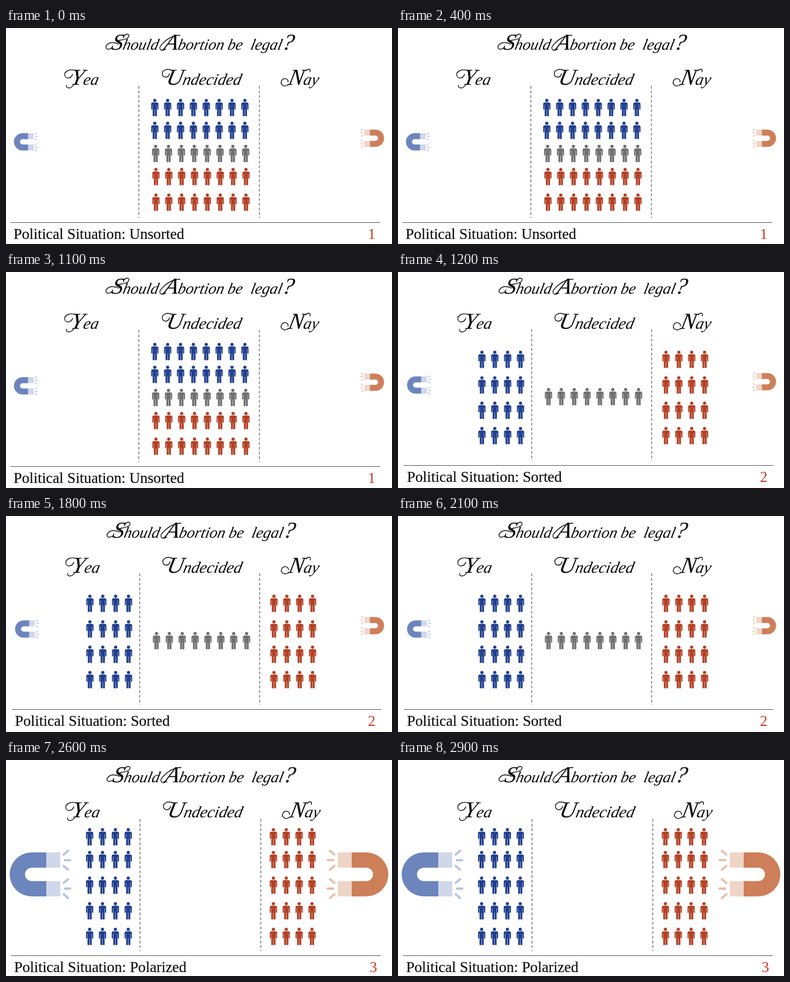
Recreate the animation shown at these times as an HTML page. Size 690 by 388 pixels, loop 3.2 s.

```html
<!DOCTYPE html>
<html lang="en">
<head>
<meta charset="utf-8">
<title>Political Situation</title>
<style>
  html, body { margin: 0; width: 100%; height: 100%; overflow: hidden; background: #fff; }
  svg { display: block; width: 100%; height: 100%; }
  .script { font: italic 28px "Liberation Serif", "Times New Roman", serif; fill: #0c0c0c; }
  .script.head { font-size: 29px; }
  .cap { font-size: 41px; }
  .swash { fill: none; stroke: #0c0c0c; stroke-width: 1.4; stroke-linecap: round; }
  .label { font: 26.8px "Liberation Serif", "Times New Roman", serif; fill: #111; stroke: #111; stroke-width: .2; }
  .count { fill: #c63a26; stroke: none; }
  .rule { stroke: #555; stroke-width: 1.1; }
  .dash { stroke: #555; stroke-width: 1.2; stroke-dasharray: 5 3.4; }
</style>
</head>
<body>
<svg id="stage" viewBox="0 0 690 388" xmlns="http://www.w3.org/2000/svg">
  <defs>
    <g id="person">
      <circle cy="3.1" r="2.9"/>
      <path d="M-3.6 6.7H3.6Q6.5 6.7 6.5 9.6V18.6Q6.5 19.7 5.4 19.7T4.3 18.6V11H3.8V30.4Q3.8 31.4 2.8 31.4H1.3Q.3 31.4 .3 30.4V19.5H-.3V30.4Q-.3 31.4-1.3 31.4H-2.8Q-3.8 31.4-3.8 30.4V11H-4.3V18.6Q-4.3 19.7-5.4 19.7T-6.5 18.6V9.6Q-6.5 6.7-3.6 6.7Z"/>
    </g>
  </defs>
</svg>
<script>
const LOOP = 3200;
const BLUE = '#213f8f', GREY = '#707070', RED = '#b34024';
const STEP = 23;
const stage = document.getElementById('stage');

// Crowd blocks: colour, first centre x, columns, row tops
const scenes = [
  {
    from: 0, to: 1200, name: 'Unsorted',
    title: [0, 0], heads: [0, 0, 0], headY: 0,
    dashes: [237.5, 453], dashY: [104, 341],
    rule: [8, 669, 349.5], label: [13.5, 379], countX: 647,
    crowd: [
      [BLUE, 266, 8, [127, 168]],
      [GREY, 267.5, 8, [209.5]],
      [RED, 268, 8, [251, 297]]
    ],
    magnets: [[14, 204.5, 0.39], [676, 198, 0.39]]
  },
  {
    from: 1200, to: 2200, name: 'Sorted',
    title: [2, 0], heads: [2, 1, 0.5], headY: 0,
    dashes: [239, 453.5], dashY: [103, 339],
    rule: [10, 671, 347.5], label: [16, 377], countX: 647,
    crowd: [
      [BLUE, 150, 4, [141, 187, 232.5, 278]],
      [GREY, 269, 8, [208]],
      [RED, 479, 4, [141, 187, 232.5, 278]]
    ],
    magnets: [[16, 203, 0.39], [676, 197, 0.39]]
  },
  {
    from: 2200, to: 3200, name: 'Polarized',
    title: [2, 0.5], heads: [2, 2, 2.5], headY: 1,
    dashes: [239.5, 455.5], dashY: [106, 343],
    rule: [9, 670, 351.5], label: [14.5, 381], countX: 650,
    crowd: [
      [BLUE, 149.5, 4, [122, 163, 209, 255, 301]],
      [RED, 478, 4, [122, 163, 209, 255, 301]]
    ],
    magnets: [[6, 205.5, 1], [684, 205.5, 1]]
  }
];

const at = (x, y, body) => `<g transform="translate(${x} ${y})">${body}</g>`;
const swash = d => `<path class="swash" d="${d}"/>`;
const big = s => `<tspan class="cap">${s}</tspan>`;
const script = (x, y, text, cls = '') =>
  `<text class="script ${cls}" transform="translate(${x} ${y}) skewX(-12)">${text}</text>`;
const line = (cls, x1, y1, x2, y2) =>
  `<line class="${cls}" x1="${x1}" y1="${y1}" x2="${x2}" y2="${y2}"/>`;

const title =
  script(187, 39, big('S') + 'hould') +
  script(281, 39, big('A') + 'bortion') +
  script(395, 39, 'be') +
  script(436, 39, 'legal' + big('?')) +
  swash('M188 36C181 41 176 36 180 31C184 25 194 25 201 29') +
  swash('M210 15C217 7 224 13 217 18C211 22 203 21 198 24') +
  swash('M283 39C276 43 272 36 278 30C286 21 298 13 311 13');

const heads = [
  script(114, 102, big('Y') + 'ea', 'head') +
    swash('M126 77C114 72 104 78 105 85C106 92 117 91 119 83') +
    swash('M121 102C116 110 107 109 108 103'),
  script(285, 102, big('U') + 'ndecided', 'head') +
    swash('M296 76C286 71 277 78 280 85C283 91 292 88 292 82'),
  script(503, 102, big('N') + 'ay', 'head') +
    swash('M505 102C496 107 489 101 493 94C497 88 506 92 504 97') +
    swash('M536 77C540 72 546 74 543 79')
];

function crowd([color, x0, cols, tops]) {
  let out = '';
  for (const y of tops)
    for (let i = 0; i < cols; i++)
      out += `<use href="#person" x="${x0 + i * STEP}" y="${y}"/>`;
  return `<g fill="${color}">${out}</g>`;
}

function magnet([x, y, size], mirrored) {
  const [body, pole, spark] = mirrored
    ? ['#cd7f59', '#efd5c8', '#e8bfa8']
    : ['#6c85bd', '#d0d7ea', '#b8c4e2'];
  const sparks = [-25.5, 25.5].map(c =>
    `M97 ${c - 10}l8-7M99 ${c}h10M97 ${c + 10}l8 7`).join('');
  return `<g transform="translate(${x} ${y}) scale(${mirrored ? -size : size} ${size})">
    <path fill="${body}" d="M66-39.5H40A39.5 39.5 0 0 0 40 39.5H66V12H40A12 12 0 0 1 40-12H66Z"/>
    <path fill="${pole}" d="M66-39.5H91V-12H66ZM66 12H91V39.5H66Z"/>
    <path d="${sparks}" fill="none" stroke="${spark}" stroke-width="3.8" stroke-linecap="round"/>
  </g>`;
}

function draw(s, i) {
  const [lx, ly] = s.label;
  const [x1, x2, ry] = s.rule;
  return at(...s.title, title) +
    heads.map((head, k) => at(s.heads[k], s.headY, head)).join('') +
    s.dashes.map(x => line('dash', x, s.dashY[0], x, s.dashY[1])).join('') +
    s.crowd.map(crowd).join('') +
    s.magnets.map((m, k) => magnet(m, k === 1)).join('') +
    line('rule', x1, ry, x2, ry) +
    `<text class="label" x="${lx}" y="${ly}">Political Situation: ${s.name}</text>` +
    `<text class="label count" x="${s.countX}" y="${ly}">${i + 1}</text>`;
}

const layers = scenes.map((s, i) => {
  const g = document.createElementNS(stage.namespaceURI, 'g');
  g.innerHTML = draw(s, i);
  return stage.appendChild(g);
});

function tick() {
  const t = performance.now() % LOOP;
  scenes.forEach((s, i) => {
    layers[i].style.display = t >= s.from && t < s.to ? '' : 'none';
  });
  requestAnimationFrame(tick);
}
tick();
</script>
</body>
</html>
```
